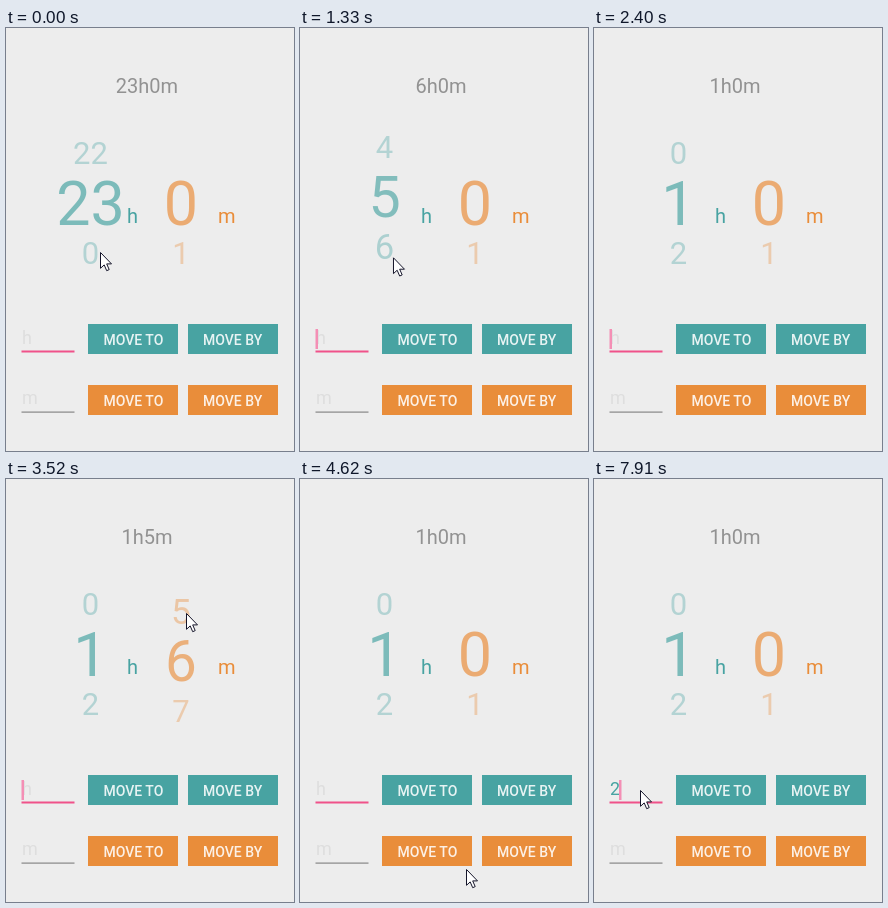
Recreate the animation shown at these times as an HTML page. Size 288 by 423 pixels, loop 8000 ms.

```html
<!DOCTYPE html>
<html lang="en">
<head>
<meta charset="utf-8">
<title>Time picker</title>
<style>
  html, body { margin: 0; width: 100%; height: 100%; overflow: hidden; background: #ededed; }
  svg { display: block; width: 288px; height: 423px; font-family: Roboto, sans-serif; }
  .teal { fill: #48a3a2; }
  .orange { fill: #e98d3a; }
  .wheel, #title { text-anchor: middle; }
  #title { font-size: 20px; fill: #929292; }
  .unit { font-size: 20px; }
  .label { font-size: 14px; font-weight: 500; fill: #fff; fill-opacity: .87; }
  .field { font-size: 18px; }
  .hint { fill: #dedede; }
  #caret { fill: #f48fb5; }
</style>
</head>
<body>
<svg viewBox="0 0 288 423">
  <defs>
    <g id="buttons">
      <rect x="82" y="296" width="90" height="30"/>
      <rect x="182" y="296" width="90" height="30"/>
      <g class="label">
        <text x="97.5" y="316.5">MOVE TO</text>
        <text x="197" y="316.5">MOVE BY</text>
      </g>
    </g>
  </defs>

  <text id="title" x="141" y="65"></text>
  <g id="hours" class="wheel teal"></g>
  <g id="minutes" class="wheel orange"></g>
  <text class="unit teal" x="121" y="195">h</text>
  <text class="unit orange" x="212" y="195">m</text>

  <use href="#buttons" class="teal"/>
  <use href="#buttons" class="orange" y="61"/>

  <text id="hourField" class="field" x="16" y="316"></text>
  <text class="field hint" x="16" y="376">m</text>
  <rect x="15.5" y="322.5" width="53" height="2" fill="#f0528a"/>
  <rect x="15.5" y="383.5" width="53" height="1.2" fill="#888"/>
  <rect id="caret" y="301" width="2.5" height="20"/>

  <path id="pointer" d="M.5 .5V16.3L4.2 12.9 6.7 18.7 9.2 17.6 6.7 11.9H11.5Z"
        fill="#fff" stroke="#15152a"/>
</svg>

<script>
const LOOP = 8000;
const TYPED_AT = 7730;
const ROW = 50, CENTER_Y = 175;
const BIG = 61, SMALL = 31, CAP_HEIGHT = 0.711;

const get = id => document.getElementById(id);
const progress = (t, from, to) => Math.min(Math.max((t - from) / (to - from), 0), 1);
const smooth = u => u * u * (3 - 2 * u);
const easeOut = u => 1 - (1 - u) ** 2;

// A flick spins each wheel up to its peak, then a drag brings it back down.
const hours = {
  id: "hours", x: 84.5, count: 24, first: 23, peak: 31, last: 25,
  up: [240, 1050], down: [1110, 2400]
};
const minutes = {
  id: "minutes", x: 175, count: 60, first: 0, peak: 6, last: 0,
  up: [2880, 3640], down: [3700, 4620]
};

const pointerStart = { x: 94, y: 224 };
const pointerMoves = [
  { from: 240, to: 600, x: 94, y: 50 },     // flick hours
  { from: 780, to: 1860, x: 92, y: 398 },   // drag hours
  { from: 1900, to: 2220, x: 96, y: 424 },  // leave
  { from: 2400, to: 2720, x: 184, y: 209 },
  { from: 2880, to: 3200, x: 196, y: 46 },  // flick minutes
  { from: 3200, to: 3520, x: 180, y: 134 },
  { from: 3700, to: 4620, x: 166, y: 390 }, // drag minutes
  { from: 5200, to: 5980, x: 36, y: 311 },  // hour field
  { from: 7900, to: 7910, x: 46, y: 311 }
];

for (const wheel of [hours, minutes]) {
  wheel.rows = [-1, 0, 1].map(() => {
    const text = document.createElementNS("http://www.w3.org/2000/svg", "text");
    text.setAttribute("x", wheel.x);
    return get(wheel.id).appendChild(text);
  });
}

// Draws the rows and returns the last value that was fully reached.
function drawWheel({ rows, count, first, peak, last, up, down }, t) {
  const pos = first + (peak - first) * easeOut(progress(t, ...up))
                    + (last - peak) * easeOut(progress(t, ...down));
  rows.forEach((row, i) => {
    const value = Math.round(pos) + i - 1;
    const offset = value - pos;
    const far = Math.min(Math.abs(offset), 1);
    const size = BIG + (SMALL - BIG) * far;
    row.textContent = value < 0 ? "" : value % count;
    row.setAttribute("y", CENTER_Y + offset * ROW + size * CAP_HEIGHT / 2);
    row.setAttribute("font-size", size);
    row.setAttribute("fill-opacity", 0.69 - 0.34 * far);
  });
  return (t < down[0] ? Math.floor(pos) : Math.ceil(pos)) % count;
}

function drawField(t) {
  const typed = t >= TYPED_AT;
  const caretOn = typed || (t + 940) % 1000 < 510;
  get("hourField").textContent = typed ? "2" : "h";
  get("hourField").setAttribute("class", typed ? "field teal" : "field hint");
  get("caret").setAttribute("x", typed ? 25 : 15.5);
  get("caret").setAttribute("visibility", caretOn ? "visible" : "hidden");
}

function drawPointer(t) {
  let { x, y } = pointerStart;
  for (const move of pointerMoves) {
    const k = smooth(progress(t, move.from, move.to));
    x += (move.x - x) * k;
    y += (move.y - y) * k;
  }
  const hidden = t >= 90 && t < pointerMoves[0].from;
  get("pointer").setAttribute("transform", `translate(${x} ${y})`);
  get("pointer").setAttribute("visibility", hidden ? "hidden" : "visible");
}

function draw(t) {
  get("title").textContent = `${drawWheel(hours, t)}h${drawWheel(minutes, t)}m`;
  drawField(t);
  drawPointer(t);
}

const start = performance.now();
function tick() {
  draw((performance.now() - start) % LOOP);
  requestAnimationFrame(tick);
}
tick();
</script>
</body>
</html>
```
